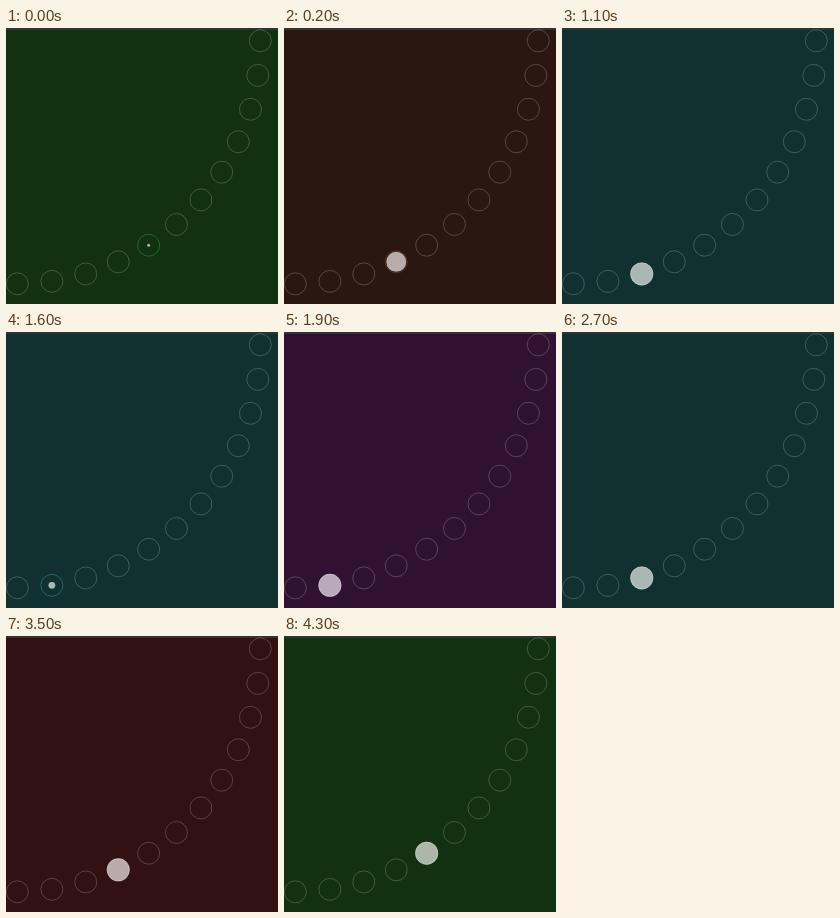
Animation, 272 px wide and 276 px high, one loop 4800 ms. Source, as an HTML page with a canvas:

```html
<!DOCTYPE html>
<html lang="en">
<head>
<meta charset="utf-8">
<title>Arc selector</title>
<style>
  html, body { margin: 0; width: 100%; height: 100%; overflow: hidden; background: #113111; }
  canvas { display: block; }
</style>
</head>
<body>
<canvas id="stage" width="272" height="276"></canvas>
<script>
const ctx = document.getElementById('stage').getContext('2d');
const LOOP = 4800, STEP = 100, PERIOD = 800;
const NODES = 12, ARC = { x: 11.3, y: 12.8, r: 243 }, RING = 11;

// Background of each selectable node, counted from the lower left.
const COLORS = { 1: [49, 17, 49], 2: [17, 49, 49], 3: [49, 17, 17], 4: [17, 49, 17] };
const STOPS = [4, 3, 2, 1, 2, 3, 4];

// One change: the old dot shrinks, the new one grows, the background follows.
const CHANGE = [
  { r: 1.5, mix: 0, old: true },
  { r: 3.4, mix: 0 },
  { r: 7, mix: 0.4 },
  { r: 10, mix: 0.8 }
];
const SETTLED = { r: 11.5, mix: 1 };
const FIRST = [CHANGE[0], CHANGE[1], CHANGE[3]];

function stateAt(time) {
  const t = Math.floor((time % LOOP) / STEP) * STEP;
  const turn = Math.min(Math.floor((t + 100) / PERIOD), STOPS.length - 2);
  const changes = turn ? CHANGE : FIRST;
  const start = turn ? turn * PERIOD - 100 : 0;
  const pose = changes[(t - start) / STEP] || SETTLED;
  const from = STOPS[turn], to = STOPS[turn + 1];
  return { ...pose, from, to, node: pose.old ? from : to };
}

function circle(k, r) {
  const a = k * Math.PI / 2 / (NODES - 1);
  ctx.beginPath();
  ctx.arc(ARC.x + ARC.r * Math.sin(a), ARC.y + ARC.r * Math.cos(a), r, 0, Math.PI * 2);
}

function draw(now) {
  const s = stateAt(now);
  const bg = COLORS[s.from].map((c, i) => Math.round(c + (COLORS[s.to][i] - c) * s.mix));
  ctx.fillStyle = `rgb(${bg})`;
  ctx.fillRect(0, 0, 272, 276);
  ctx.fillStyle = '#333';
  ctx.fillRect(0, 0, 272, 2);

  ctx.lineWidth = 1;
  for (let k = 0; k < NODES; k++) {
    const lit = k === s.node && s.mix < 1;
    ctx.strokeStyle = lit ? `rgb(${bg.map(c => c * 2.1)})` : 'rgba(255,255,255,.2)';
    circle(k, RING);
    ctx.stroke();
  }
  ctx.fillStyle = 'rgba(255,255,255,.65)';
  circle(s.node, s.r);
  ctx.fill();
}

const begin = performance.now();
function tick() {
  draw(performance.now() - begin);
  requestAnimationFrame(tick);
}
tick();
</script>
</body>
</html>
```
